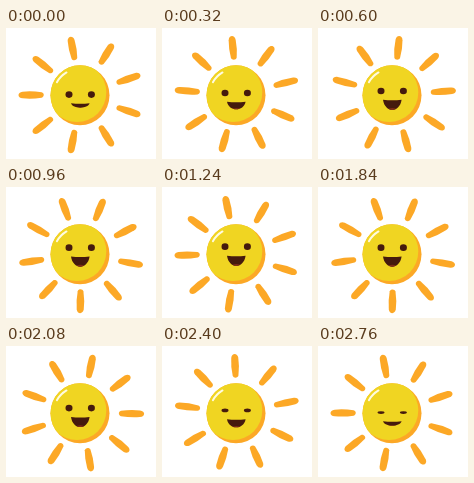
An HTML page with a canvas for the animation above (2800 ms loop, 150 by 131 pixels).

```html
<!DOCTYPE html>
<html lang="en">
<head>
<meta charset="utf-8">
<title>Smiling sun</title>
<style>
html, body { margin: 0; width: 100%; height: 100%; overflow: hidden; background: #fff; }
canvas { display: block; width: 150px; height: 131px; }
</style>
</head>
<body>
<canvas id="stage" width="150" height="131"></canvas>
<script>
const ctx = document.getElementById('stage').getContext('2d');
const LOOP = 2800, TAU = Math.PI * 2;
const CENTER = { x: 75.3, y: 67 };
const ORANGE = '#fca826', BROWN = '#451a0d';

const clamp = v => Math.max(0, Math.min(1, v));
const smooth = v => { const k = clamp(v); return k * k * (3 - 2 * k); };
const mix = (a, b, k) => a + (b - a) * k;

function disc(x, y, rx, ry, color) {
  ctx.fillStyle = color;
  ctx.beginPath();
  ctx.ellipse(x, y, rx, ry, 0, 0, TAU);
  ctx.fill();
}

function drawRays(turn) {
  ctx.fillStyle = ORANGE;
  for (let i = 0; i < 9; i++) {
    ctx.save();
    ctx.translate(CENTER.x, CENTER.y);
    ctx.scale(1.03, 0.97);
    ctx.rotate((20 + i * 40 + turn) * TAU / 360);
    ctx.beginPath();
    ctx.moveTo(38.5, -2.8);
    ctx.quadraticCurveTo(48, -4.3, 57, -3.4);
    ctx.bezierCurveTo(62.3, -2.8, 62.3, 2.8, 57, 3.4);
    ctx.quadraticCurveTo(48, 4.3, 38.5, 2.8);
    ctx.bezierCurveTo(35.8, 2, 35.8, -2, 38.5, -2.8);
    ctx.fill();
    ctx.restore();
  }
}

function drawBody() {
  disc(74, 67.3, 29.5, 30, ORANGE);
  ctx.save();
  ctx.clip();
  disc(71, 64.4, 29.3, 29.7, '#f0d522');
  ctx.restore();
  ctx.strokeStyle = '#fffbe0';
  ctx.lineWidth = 2;
  ctx.lineCap = 'round';
  ctx.beginPath();
  ctx.arc(73.8, 67, 26.2, 3.65, 4.18);
  ctx.stroke();
}

function drawFace(lift, grin, eyeOpen) {
  const eyeY = mix(66.6, 59.5, lift);
  for (const side of [-1, 1]) disc(74.2 + side * 11.2, eyeY, 3.5, 3.3 * eyeOpen, BROWN);

  const x = 74.3, half = 9.3;
  const top = mix(75.3, 68.5, lift), depth = mix(4.5, 10.3, grin);
  ctx.fillStyle = BROWN;
  ctx.beginPath();
  ctx.moveTo(x - half, top);
  ctx.quadraticCurveTo(x, top + 1, x + half, top);
  ctx.bezierCurveTo(x + half * 0.8, top + depth * 1.3, x - half * 0.8, top + depth * 1.3, x - half, top);
  ctx.fill();
  ctx.save();
  ctx.clip();
  disc(x, top + depth + 0.5, 4.5, depth * 0.25, '#7d2b18');
  ctx.restore();
}

function draw(now) {
  const t = now % LOOP;
  const swing = (1 - Math.cos(TAU * t / LOOP)) / 2;
  const grin = smooth(t / 600) * (1 - smooth((t - 2150) / 650));
  const eyeOpen = mix(1, 0.42, smooth((t - 2120) / 400));
  const lift = Math.pow(swing, 0.7);

  ctx.clearRect(0, 0, 150, 131);
  drawRays(40 * swing);
  drawBody();
  drawFace(lift, grin, eyeOpen);
}

const start = performance.now();
function tick() {
  draw(performance.now() - start);
  requestAnimationFrame(tick);
}
draw(0);
requestAnimationFrame(tick);
</script>
</body>
</html>
```
